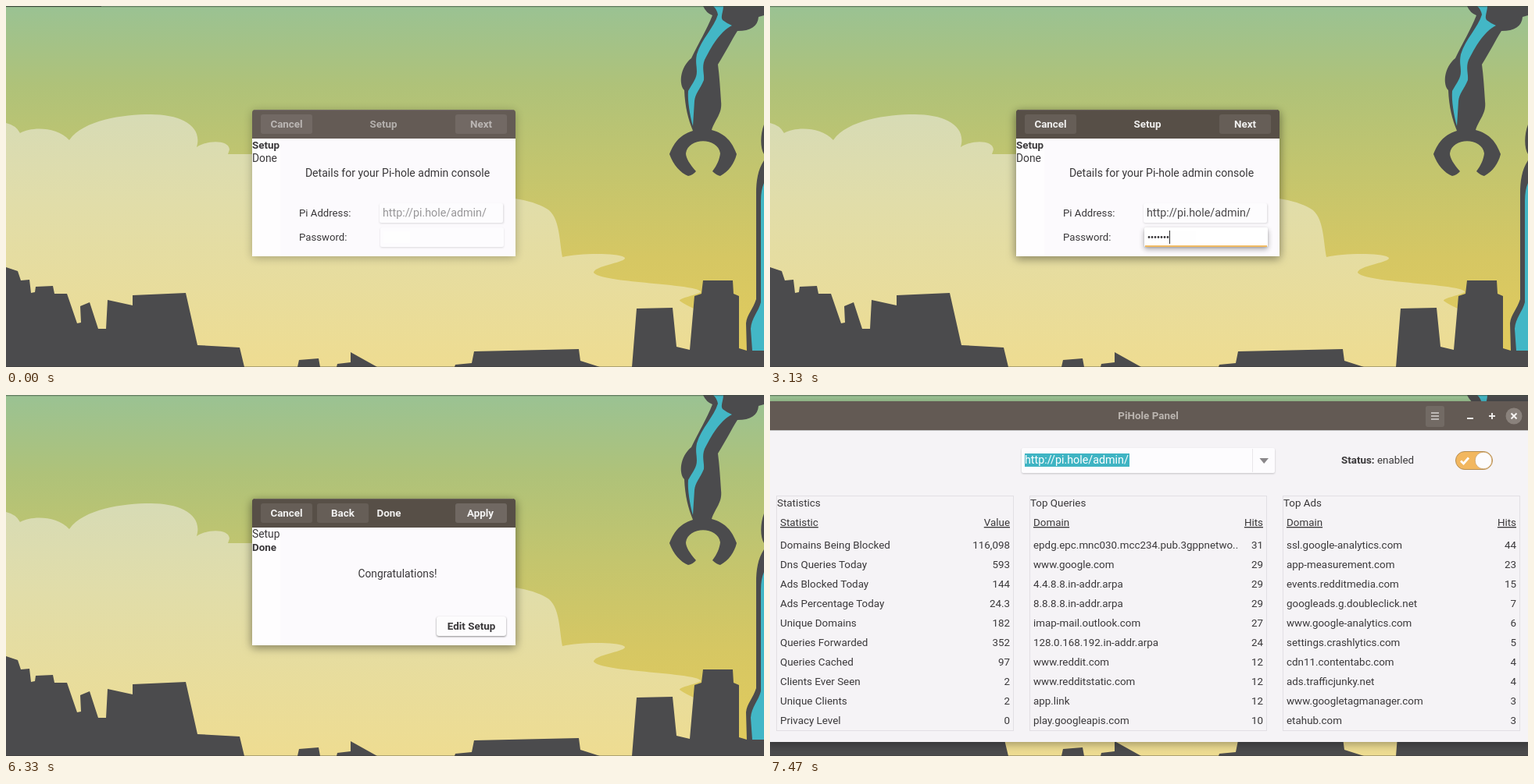
An HTML page for the animation above (8000 ms loop, 970 by 463 pixels).

```html
<!DOCTYPE html>
<html lang="en">
<head>
<meta charset="utf-8">
<title>PiHole Panel setup</title>
<style>
html, body { margin: 0; width: 100%; height: 100%; overflow: hidden; background: #4b4b4d; }
svg { display: block; width: 970px; height: 463px; }
text { font: 13.8px Roboto, sans-serif; fill: #3a383a; white-space: pre; }
.b { font-weight: 700; font-size: 13.4px; }
.mid { text-anchor: middle; }
.end { text-anchor: end; }
.bar text { fill: #fff; }
.btn { fill: #fff; fill-opacity: .09; }
.press { fill: #fff; opacity: 0; }
.panel text { font-size: 13.4px; }
.label { font-size: 13.2px; }
.url, .panel .url { font-size: 14.3px; }
.u { text-decoration: underline; }

.anim, .dialog, .panel, .close-hot, .flash { animation: 8s step-end infinite; }
.flash { animation-name: flash; }
.focus { animation-name: focus; }
.wake { animation-name: wake; }
.field { animation-name: field; }
.type { animation-name: type; }
.caret { animation-name: caret; }
.next { animation-name: next; }
.apply { animation-name: apply; }
.page1 { animation-name: page1; }
.page2 { animation-name: page2; }
.dialog { animation-name: dialog; transform-origin: 483.5px 227px; }
.panel { animation-name: panel; transform-origin: 484px 448px; }
.close-hot { animation-name: cool; }

@keyframes flash { 0% { opacity: 1 } .875%, 100% { opacity: 0 } }
@keyframes focus { 0% { opacity: 0 } 14.125% { opacity: .3 } 15% { opacity: .6 } 15.875% { opacity: .85 } 16.625%, 100% { opacity: 1 } }
@keyframes wake { 0% { opacity: .52 } 14.125% { opacity: .65 } 15% { opacity: .78 } 15.875% { opacity: .86 } 16.625%, 100% { opacity: .92 } }
@keyframes field {
  0% { opacity: 0 } 14.125% { opacity: .3 } 15% { opacity: .6 } 15.875% { opacity: .85 } 16.625% { opacity: 1 }
  60.875% { opacity: .5 } 61.625%, 100% { opacity: 0 }
}
@keyframes type {
  0% { transform: none } 30.875% { transform: translateX(4px) } 33.375% { transform: translateX(8px) }
  34.25% { transform: translateX(12px) } 35% { transform: translateX(20px) }
  39.125% { transform: translateX(28px) } 41.625%, 100% { transform: translateX(32px) }
}
@keyframes caret { 0% { opacity: 0 } 14.125% { opacity: 1 } 23.375% { opacity: 0 } 25.875% { opacity: 1 } 57.5%, 100% { opacity: 0 } }
@keyframes next { 0% { opacity: 0 } 57.5% { opacity: .02 } 59.125% { opacity: .07 } 60.875% { opacity: .18 } 61.625%, 100% { opacity: .26 } }
@keyframes apply { 0% { opacity: 0 } 78.375% { opacity: .04 } 79.125% { opacity: .07 } 80.875%, 100% { opacity: .26 } }
@keyframes page1 { 0% { visibility: visible } 68.375%, 100% { visibility: hidden } }
@keyframes page2 { 0% { visibility: hidden } 68.375%, 100% { visibility: visible } }
@keyframes dialog { 0% { opacity: 1; transform: none } 90% { opacity: .97; transform: scale(.997) } 90.875%, 100% { opacity: 0 } }
@keyframes panel { 0% { opacity: 0; transform: scale(.9865) } 90.875% { opacity: .98; transform: scale(.9865) } 91.625%, 100% { opacity: 1; transform: none } }
@keyframes cool { 0% { opacity: 1 } 91.625% { opacity: .6 } 92.5% { opacity: .25 } 93.375%, 100% { opacity: 0 } }
</style>
</head>
<body>
<svg viewBox="0 0 970 463">
  <defs>
    <linearGradient id="sky" gradientUnits="userSpaceOnUse" x1="0" y1="0" x2="0" y2="463">
      <stop offset="0" stop-color="#9ac293"/><stop offset=".22" stop-color="#afc279"/>
      <stop offset=".45" stop-color="#c3c56e"/><stop offset=".7" stop-color="#d6c763"/>
      <stop offset="1" stop-color="#e3cb5c"/>
    </linearGradient>
    <linearGradient id="cloud" gradientUnits="userSpaceOnUse" x1="0" y1="139" x2="0" y2="463">
      <stop offset="0" stop-color="#d7dbb5"/><stop offset=".35" stop-color="#e1dda9"/>
      <stop offset="1" stop-color="#eedc91"/>
    </linearGradient>
    <filter id="soft" x="-20%" y="-30%" width="140%" height="160%"><feGaussianBlur stdDeviation="6"/></filter>
    <filter id="fine" x="-20%" y="-50%" width="140%" height="200%"><feGaussianBlur stdDeviation="1.3"/></filter>
    <filter id="lift" x="-20%" y="-80%" width="140%" height="260%"><feGaussianBlur stdDeviation="3.5"/></filter>
  </defs>

  <!-- wallpaper -->
  <rect width="970" height="463" fill="url(#sky)"/>
  <path fill="url(#cloud)" d="M0 150Q13 153 18 163C32 155 64 154 81 172C99 146 150 139 185 139C224 139 252 154 244 181C257 172 285 171 286 184L284 190H315L640 246Q672 248 692 260C709 270 708 302 712 322C738 316 788 317 792 323C793 329 753 333 752 342C758 350 802 353 840 357C870 360 890 363 889 367C880 372 863 374 862 378Q870 384 885 390L940 463H0Z"/>
  <g fill="#4b4b4d">
    <path d="M0 335L15 340 19 352 30 351 32 368 37 367 38 360 60 359 62 369 78 369 91 407 96 406 95 385 107 380 118 414 128 414 130 377 162 384 162 371 230 368 245 435 299 438 305 463H0Z"/>
    <path d="M373 463L375 454 400 452 402 463ZM423 463L424 459 441 457V444L475 463ZM574 463L575 460 596 458 599 443 733 440 735 455 760 463Z"/>
    <path d="M801 463L807 388 853 387 858 437 875 441 881 372 890 369 892 352H930L931 369 938 372V439L948 442H970V463Z"/>
    <path d="M892 0Q896 9 904 12C897 30 886 48 877 67C862 79 861 101 868 108C869 130 873 145 879 160C860 166 854 178 849 190C854 204 863 214 873 218Q879 217 883 212C875 203 870 195 870 189C873 168 911 168 914 189C913 197 910 204 904 212Q909 217 914 218C925 212 932 202 935 190C929 174 921 164 903 159C908 144 917 138 915 122C914 107 913 90 911 75C921 59 929 43 936 32C953 32 962 26 963 14L970 12V0Z"/>
    <path d="M970 152C965 165 965 182 970 190ZM970 198C962 210 960 225 960 240V376C956 389 948 396 947 407L948 443H970Z"/>
  </g>
  <g fill="#43b7c6">
    <path d="M905 0H918C918 7 914 14 917 18Q922 22 929 25C912 34 902 54 894 69C890 79 894 87 893 95C888 107 882 112 881 122L879 154C875 140 872 121 873 109C879 98 884 93 884 84C884 76 882 72 884 62C890 42 906 28 911 11Q910 5 905 0Z"/>
    <path d="M970 227Q966 236 966 250V380C963 392 954 400 953 414L955 442H970Z"/>
  </g>
  <path d="M0 .5H970" stroke="#3c4a3c" stroke-opacity=".55"/>
  <path d="M0 1.5H970" stroke="#3c4a3c" stroke-opacity=".18"/>
  <path d="M0 462.5H970" stroke="#333" stroke-opacity=".35"/>
  <path class="flash" d="M0 .5H122" stroke="#222" stroke-opacity=".55"/>

  <!-- setup dialog -->
  <g class="dialog">
    <rect x="315" y="135" width="337" height="188" rx="4" opacity=".27" filter="url(#soft)"/>
    <rect class="anim focus" x="313" y="136" width="341" height="190" rx="4" fill-opacity=".18" filter="url(#soft)"/>
    <path d="M315 170V137Q315 133 319 133H648Q652 133 652 137V170Z" fill="#645b55"/>
    <path class="anim focus" d="M315 170V137Q315 133 319 133H648Q652 133 652 137V170Z" fill="#574f47"/>
    <path d="M318 133.5H649" stroke="#fff" stroke-opacity=".1"/>
    <rect x="315" y="170" width="337" height="151" fill="#fcfafd"/>
    <rect x="315" y="170" width="36" height="151" fill="#fefdfe"/>

    <g class="bar">
      <rect class="btn" x="326" y="139" width="66" height="25" rx="3"/>
      <rect class="btn" x="575" y="139" width="66" height="25" rx="3"/>
      <text class="b mid anim wake" x="359" y="156">Cancel</text>
      <g class="anim page1">
        <rect class="press anim next" x="575" y="139" width="66" height="25" rx="3"/>
        <g class="anim wake">
          <text class="b mid" x="483" y="156">Setup</text>
          <text class="b mid" x="608" y="156">Next</text>
        </g>
      </g>
      <g class="anim page2">
        <rect class="btn" x="398" y="139" width="66" height="25" rx="3"/>
        <rect class="press anim apply" x="575" y="139" width="66" height="25" rx="3"/>
        <g opacity=".92">
          <text class="b mid" x="431" y="156">Back</text>
          <text class="b mid" x="490" y="156">Done</text>
          <text class="b mid" x="607" y="156">Apply</text>
        </g>
      </g>
    </g>

    <g class="anim page1">
      <text class="b" x="315" y="183">Setup</text>
      <text x="315" y="200">Done</text>
      <text class="mid" x="501" y="219" style="font-size:14.05px">Details for your Pi-hole admin console</text>
      <text class="label" x="375" y="270">Pi Address:</text>
      <text class="label" x="375" y="301">Password:</text>
      <rect x="478" y="254" width="159" height="25" rx="2" opacity=".13" filter="url(#fine)"/>
      <rect x="478" y="253" width="158" height="25" rx="2" fill="#fdfcfe"/>
      <text class="url anim wake" x="482" y="270">http://pi.hole/admin/</text>
      <rect x="479" y="285" width="158" height="25" rx="2" opacity=".13" filter="url(#fine)"/>
      <rect x="479" y="284" width="158" height="25" rx="2" fill="#fdfcfe"/>
      <g class="anim field">
        <rect x="479" y="287" width="158" height="25" rx="2" opacity=".32" filter="url(#lift)"/>
        <rect x="479" y="284" width="158" height="25" rx="2" fill="#fff"/>
        <path d="M480 308H636" stroke="#eda52f" stroke-width="1.6"/>
      </g>
      <path d="M485 296.5H514" stroke="#3a383a" stroke-width="2.8" stroke-linecap="round" stroke-dasharray="0 4"/>
      <g class="anim type">
        <rect x="483" y="289" width="34" height="15" fill="#fefefe"/>
        <rect class="anim caret" x="483" y="288" width="1" height="17" fill="#333"/>
      </g>
    </g>

    <g class="anim page2">
      <text x="315" y="183">Setup</text>
      <text class="b" x="315" y="200">Done</text>
      <text class="mid" x="501" y="234">Congratulations!</text>
      <rect x="551" y="285" width="89" height="25" rx="3" opacity=".45" filter="url(#fine)"/>
      <rect x="551" y="284" width="89" height="25" rx="3" fill="#fdfcfd"/>
      <text class="b mid" x="595.5" y="301">Edit Setup</text>
    </g>
  </g>

  <!-- main window -->
  <g class="panel">
    <rect x="-6" y="11" width="981" height="437" opacity=".32" filter="url(#soft)"/>
    <path d="M-6 445V12Q-6 8 -2 8H971Q975 8 975 12V445Z" fill="#f5f3f6"/>
    <path d="M-6 45V12Q-6 8 -2 8H971Q975 8 975 12V45Z" fill="#635a54"/>
    <path d="M-6 45.5H975" stroke="#000" stroke-opacity=".2"/>
    <text class="b mid" x="484" y="31" style="fill:#bbb5b0">PiHole Panel</text>
    <rect x="839" y="14" width="24" height="27" rx="3" fill="#726a64"/>
    <path d="M846 23H856M846 27H856M846 31H856" stroke="#d5d1ce" stroke-width="1.6"/>
    <path d="M892 30H900M920 27H928M924 23V31" stroke="#eceae8" stroke-width="2"/>
    <circle cx="952" cy="27" r="10.5" fill="#8a827c"/>
    <circle class="close-hot" cx="952" cy="27" r="10.5" fill="#efae45"/>
    <path d="M948.5 23.5L955.5 30.5M955.5 23.5L948.5 30.5" stroke="#f6f4f3" stroke-width="2"/>

    <rect x="322" y="69" width="324" height="32" rx="2" opacity=".2" filter="url(#fine)"/>
    <rect x="322" y="68" width="324" height="32" rx="2" fill="#fdfcfe"/>
    <path d="M617.5 69V99" stroke="#e9e6ea"/>
    <path d="M626.5 81H638L632.2 88Z" fill="#8a878a"/>
    <rect x="326" y="75" width="134" height="17" fill="#3fb4c3"/>
    <text class="url" x="326" y="88" style="fill:#fff">http://pi.hole/admin/</text>
    <text x="731" y="88"><tspan font-weight="700">Status:</tspan> enabled</text>
    <rect x="877.5" y="72.5" width="47" height="23" rx="11.5" fill="#f2b75f" stroke="#b58f55"/>
    <path d="M884 84.5L887.5 88L894 80.5" fill="none" stroke="#fff" stroke-width="2.8"/>
    <circle cx="913" cy="84" r="10.8" fill="#fdfcfd" stroke="#c9a066" stroke-width=".8"/>
    <g id="tables"></g>
  </g>
</svg>
<script>
const tables = [
  ['Statistics', 'Statistic', 'Value', `Domains Being Blocked 116,098
Dns Queries Today 593
Ads Blocked Today 144
Ads Percentage Today 24.3
Unique Domains 182
Queries Forwarded 352
Queries Cached 97
Clients Ever Seen 2
Unique Clients 2
Privacy Level 0`],
  ['Top Queries', 'Domain', 'Hits', `epdg.epc.mnc030.mcc234.pub.3gppnetwo.. 31
www.google.com 29
4.4.8.8.in-addr.arpa 29
8.8.8.8.in-addr.arpa 29
imap-mail.outlook.com 27
128.0.168.192.in-addr.arpa 24
www.reddit.com 12
www.redditstatic.com 12
app.link 12
play.googleapis.com 10`],
  ['Top Ads', 'Domain', 'Hits', `ssl.google-analytics.com 44
app-measurement.com 23
events.redditmedia.com 15
googleads.g.doubleclick.net 7
www.google-analytics.com 6
settings.crashlytics.com 5
cdn11.contentabc.com 4
ads.trafficjunky.net 4
www.googletagmanager.com 3
etahub.com 3`]
];

const label = (x, y, text, cls = '') => `<text class="${cls}" x="${x}" y="${y}">${text}</text>`;

document.getElementById('tables').innerHTML = tables.map(([title, key, value, rows], i) => {
  const x = 9 + 324 * i, left = x + 4, right = x + 298;
  const lines = rows.split('\n').map((row, n) => {
    const cut = row.lastIndexOf(' '), y = 197 + 25 * n;
    return label(left, y, row.slice(0, cut)) + label(right, y, row.slice(cut + 1), 'end');
  });
  return `<rect x="${x - .5}" y="129.5" width="303" height="301" fill="none" stroke="#e2dfe4"/>`
    + label(x, 143, title) + label(left, 168, key, 'u') + label(right, 168, value, 'u end') + lines.join('');
}).join('');
</script>
</body>
</html>
```
